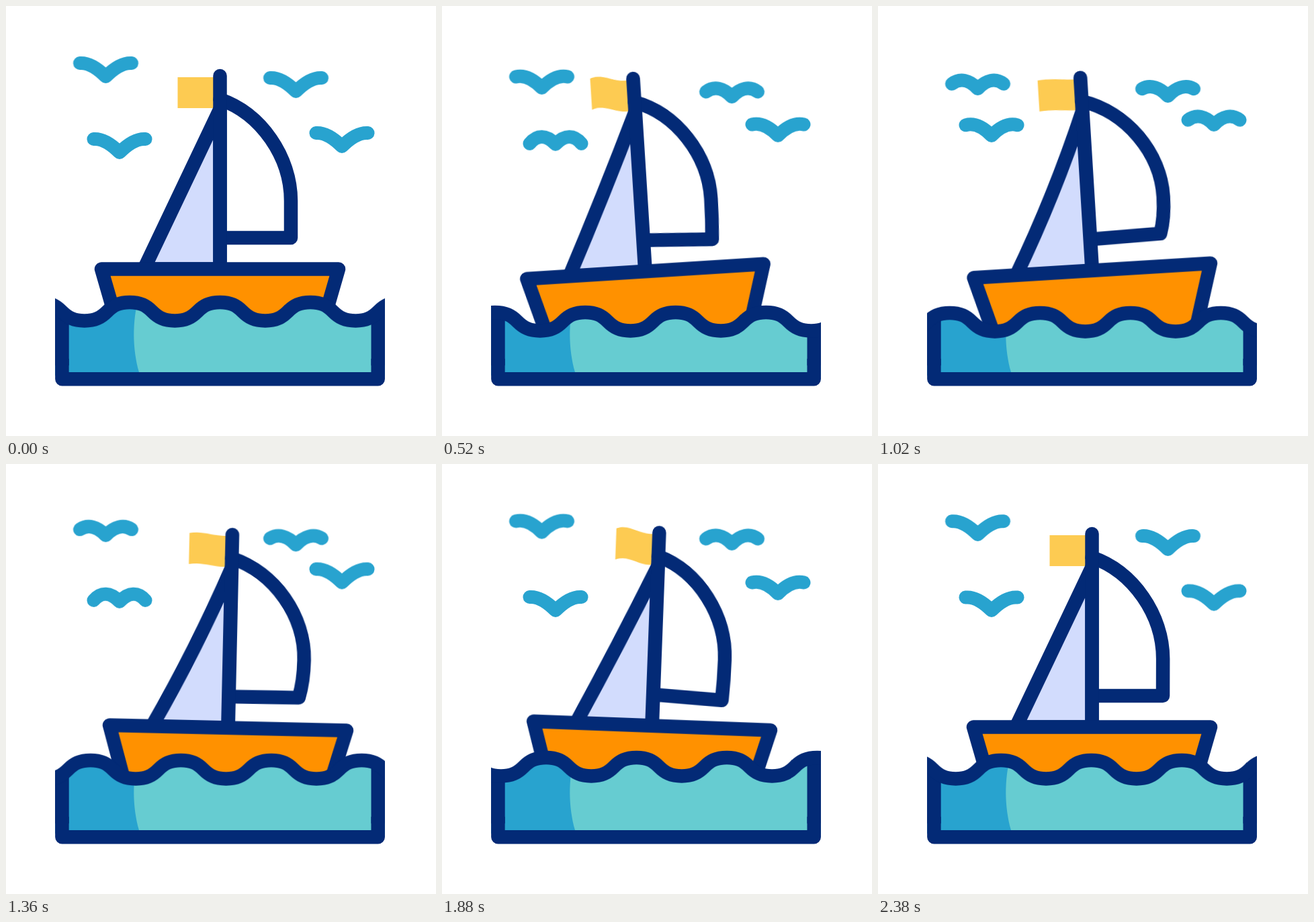
Recreate the animation shown at these times as an HTML page. Size 640 px wide and 640 px high, loop 2400 ms.

```html
<!DOCTYPE html>
<html lang="en">
<head>
<meta charset="utf-8">
<title>Sailing boat</title>
<style>
  html, body { margin: 0; width: 100%; height: 100%; overflow: hidden; background: #fff; }
  svg { display: block; width: 100%; height: 100%; }

  .line { fill: none; stroke: #032a76; stroke-width: 20.5; stroke-linejoin: round; stroke-linecap: round; }
  .move, .boat, .tilt, .swell, .drift, .sail, .jib, .flag, .bird, .bird path {
    animation: 2.4s cubic-bezier(.333, 0, .667, 1) infinite;
  }

  /* sea */
  .swell { animation-name: swell; }
  .drift { animation-name: drift; animation-timing-function: linear; }
  @keyframes swell {
    33.333% { transform: translateY(20.8px); }
    66.667% { transform: translateY(-5.6px); }
  }
  @keyframes drift { to { transform: translateX(134.5px); } }

  /* boat */
  .boat { animation-name: sway; }
  .tilt { animation-name: tilt; transform-origin: 318.5px 391.5px; }
  @keyframes sway {
    0%, 100% { transform: translate(0, 0); }
    25% { transform: translate(-16.8px, 3.7px); }
    56.25% { transform: translate(12px, 1.2px); }
    79.17% { transform: translate(-6px, -1.9px); }
  }
  @keyframes tilt {
    0%, 100% { transform: rotate(0deg); }
    33.333% { transform: rotate(-5deg); }
    66.667% { transform: rotate(3deg); }
  }

  .sail { animation-name: sail; d: path("M318.5 139 C380 160 424 225 424 290 Q424 320 424 345 L318.5 345"); }
  @keyframes sail {
    12.5%, 37.5%, 62.5%, 87.5% { d: path("M318.5 139 C388 158 437 222 437 287 Q437 320 425 337.5 L318.5 345"); }
    25%, 50%, 75% { d: path("M318.5 139 C378 160 420 225 420 290 Q420 320 420 352.5 L318.5 345"); }
  }

  .jib { animation-name: jib; d: path("M318.5 153.5 Q262 272.5 205.3 391.5 L318.5 391.5 Z"); }
  @keyframes jib {
    0%, 25%, 50%, 75%, 100% { d: path("M318.5 153.5 Q262 272.5 205.3 391.5 L318.5 391.5 Z"); }
    12.5%, 37.5%, 62.5%, 87.5% { d: path("M318.5 153.5 Q273.8 278 205.3 391.5 L318.5 391.5 Z"); }
  }

  .flag { animation-name: flag; d: path("M309 106 C290 106 273 106 255.5 106 L255.5 152 C273 152 290 152 309 152 Z"); }
  @keyframes flag {
    16.667%, 50%, 83.333% { d: path("M309 106 C290 111 273 82 254.5 95.5 L254.5 142 C273 128 290 157 309 152 Z"); }
    33.333%, 66.667% { d: path("M309 106 C290 98 273 130 255 116 L255 162 C273 176 290 144 309 152 Z"); }
  }

  /* birds */
  .bird path {
    --rest: path("M-38.5 -20 C-24 -21 -10 -10 0 0 C10 -10 24 -21 38.5 -20");
    --up: path("M-38.5 0 C-28 -14 -14 -15 0 0 C14 -15 28 -14 38.5 0");
    d: var(--rest);
    fill: none; stroke: #28a3cf; stroke-width: 20; stroke-linecap: round; stroke-linejoin: round;
  }
  .b1 { animation-name: rise1; }
  .b2 { animation-name: rise2; }
  .b3 { animation-name: rise3; }
  .b4 { animation-name: rise4; }
  .b1 path { animation-name: flap1; }
  .b2 path { animation-name: flap2; --up: path("M-38.5 -4 C-27.2 -15.4 -13.2 -14 0 0 C13.2 -14 27.2 -15.4 38.5 -4"); }
  .b3 path { animation-name: flap3; }
  .b4 path { animation-name: flap4; }

  @keyframes rise1 {
    33.333% { transform: translateY(23.3px); }
    66.667% { transform: translateY(-4.8px); }
  }
  @keyframes rise2 {
    33.333% { transform: translateY(11.3px); }
    66.667% { transform: translateY(-11.6px); }
  }
  @keyframes rise3 {
    44.2% { transform: translateY(-25.2px); }
    70%, 100% { transform: translateY(0); }
  }
  @keyframes rise4 {
    0% { animation-timing-function: cubic-bezier(.33, .2, .67, .95); }
    50% { transform: translateY(-34.5px); animation-timing-function: cubic-bezier(.33, .05, .67, .8); }
  }
  @keyframes flap1 {
    0%, 25%, 50%, 75%, 100% { d: var(--rest); }
    12.5%, 37.5%, 62.5%, 87.5% { d: var(--up); }
  }
  @keyframes flap2 {
    0%, 33.333%, 66.667%, 100% { d: var(--rest); }
    16.667%, 50%, 83.333% { d: var(--up); }
  }
  @keyframes flap3 {
    0%, 50%, 66.667%, 83.333%, 100% { d: var(--rest); }
    25%, 58.333%, 91.667% { d: var(--up); }
  }
  @keyframes flap4 {
    0%, 25%, 50%, 75%, 100% { d: var(--rest); }
    12.5%, 37.5%, 87.5% { d: var(--up); }
  }
</style>
</head>
<body>
<svg viewBox="0 0 640 640">
  <defs>
    <path id="crest"/>
    <path id="water"/>
    <clipPath id="basin"><path d="M73 380H564V550H73Z"/></clipPath>
    <clipPath id="shade"><path d="M73 380H205L197 435C188 470 188 510 198 545V550H73Z"/></clipPath>
    <clipPath id="sides"><path d="M73 380H93.7V535H73ZM543.5 380H564V535H543.5Z"/></clipPath>
  </defs>

  <g transform="translate(148.5 105)"><g class="bird b1"><path/></g></g>
  <g transform="translate(431.5 127)"><g class="bird b2"><path/></g></g>
  <g transform="translate(169 218)"><g class="bird b3"><path/></g></g>
  <g transform="translate(500 209)"><g class="bird b4"><path/></g></g>

  <g class="boat"><g class="tilt">
    <path class="flag" fill="#fdcb52"/>
    <path class="line sail"/>
    <path class="line jib" style="fill:#d2dcfd"/>
    <path class="line" d="M318.5 104V391.5"/>
    <path class="line" d="M142 391.5H495L466 492H171Z" style="fill:#ff9100"/>
  </g></g>

  <g clip-path="url(#basin)"><g class="swell"><g class="drift"><use href="#water" fill="#66ccd1"/></g></g></g>
  <g clip-path="url(#shade)"><g class="swell"><g class="drift"><use href="#water" fill="#28a3cf"/></g></g></g>
  <g clip-path="url(#sides)"><g class="swell"><g class="drift"><use href="#water" fill="#032a76"/></g></g></g>
  <g clip-path="url(#basin)"><g class="swell"><g class="drift"><use href="#crest" class="line"/></g></g></g>
  <path class="line" d="M83.4 525V555.2H553.7V525" style="stroke-linecap:butt"/>
</svg>
<script>
  // One wave, crest to crest, repeated across the basin.
  const wave = "c16 0 24.5 4.6 33.625 13.7s17.6 13.7 33.625 13.7" +
               "s24.5 -4.6 33.625 -13.7s17.6 -13.7 33.625 -13.7";
  const line = "M-85 441" + wave.repeat(5);
  document.getElementById("crest").setAttribute("d", line);
  document.getElementById("water").setAttribute("d", line + "V620H-85Z");
</script>
</body>
</html>
```
